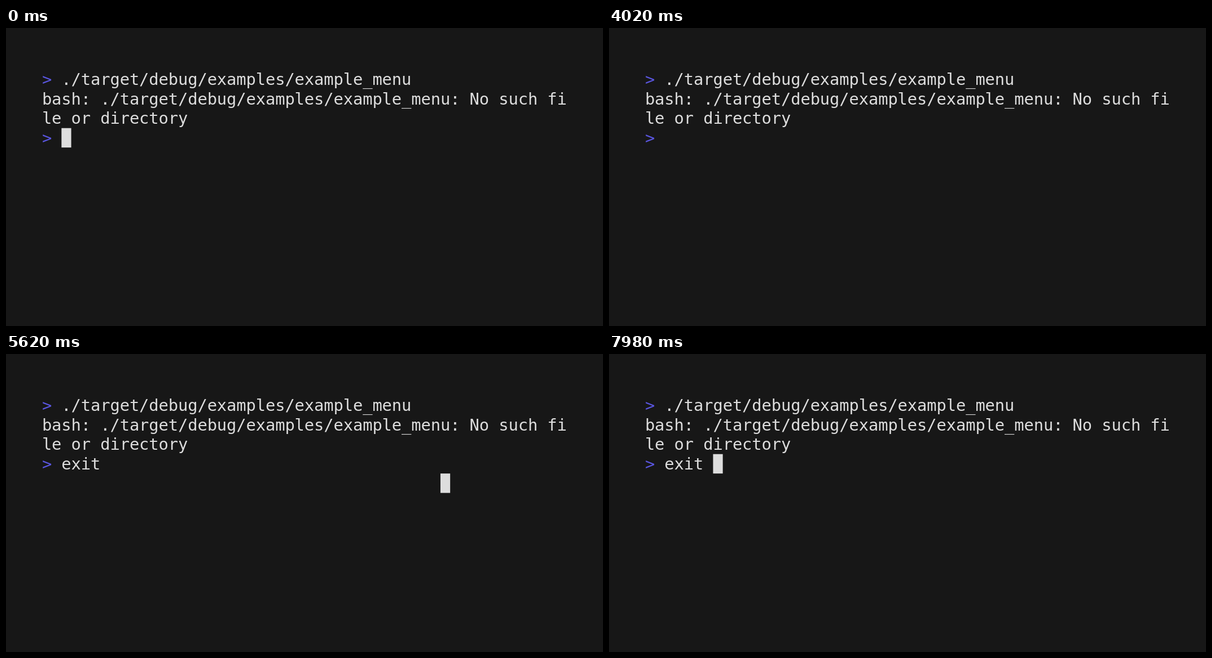
Animation of 1058x529 px, one loop 8 s. Source, as an HTML page with a canvas:

```html
<!DOCTYPE html>
<html lang="en">
<head>
<meta charset="utf-8">
<title>Terminal</title>
<style>
html, body { margin: 0; width: 100%; height: 100%; overflow: hidden; background: #171717; }
canvas { display: block; }
</style>
</head>
<body>
<canvas id="stage" width="1058" height="529"></canvas>
<script>
const ctx = document.getElementById("stage").getContext("2d");
const LOOP = 8000, LEFT = 63.9, TOP = 74.35, CELL = 17.22, LINE = 34.45, BASE = 27;
const FG = "#dddddd", ACCENT = "#5a56e0";

const output = [
  "> ./target/debug/examples/example_menu",
  "bash: ./target/debug/examples/example_menu: No such fi",
  "le or directory",
];
const longCommand = [
  '>  set +o history; unset PROMPT_COMMAND; export PS1="\\',
  '[\\e[38;2;90;86;224m\\]> \\[\\e[0m\\]"; clear;',
];
// Start time, input lines, cursor column and row
const scenes = [
  [0, [">"], 2, 3],
  [4260, longCommand, 41, 4],
  [5620, ["> exit"], 41, 4], // the cursor lags one step behind the text
  [5640, ["> exit"], 6, 3],
  [7980, ["> exit "], 7, 3],
];
const blinks = [520, 1100, 1700, 2280, 2880, 3440, 4020, 4260, 4860, 5440, 6220, 6800, 7380, 7980];

function drawLine(text, row) {
  [...text].forEach((ch, col) => {
    ctx.fillStyle = col === 0 && ch === ">" ? ACCENT : FG;
    ctx.fillText(ch, LEFT + col * CELL, TOP + row * LINE + BASE);
  });
}

function draw(t) {
  const [, input, col, row] = scenes.findLast(scene => scene[0] <= t);
  const cursorOn = blinks.filter(b => b <= t).length % 2 === 0;
  ctx.fillStyle = "#171717";
  ctx.fillRect(0, 0, 1058, 529);
  ctx.font = '28.8px "DejaVu Sans Mono", monospace';
  output.concat(input).forEach(drawLine);
  if (cursorOn) {
    ctx.fillStyle = FG;
    ctx.fillRect(LEFT + col * CELL, TOP + row * LINE, CELL, LINE);
  }
}

const start = performance.now();
function tick() {
  draw((performance.now() - start) % LOOP);
  requestAnimationFrame(tick);
}
tick();
</script>
</body>
</html>
```
